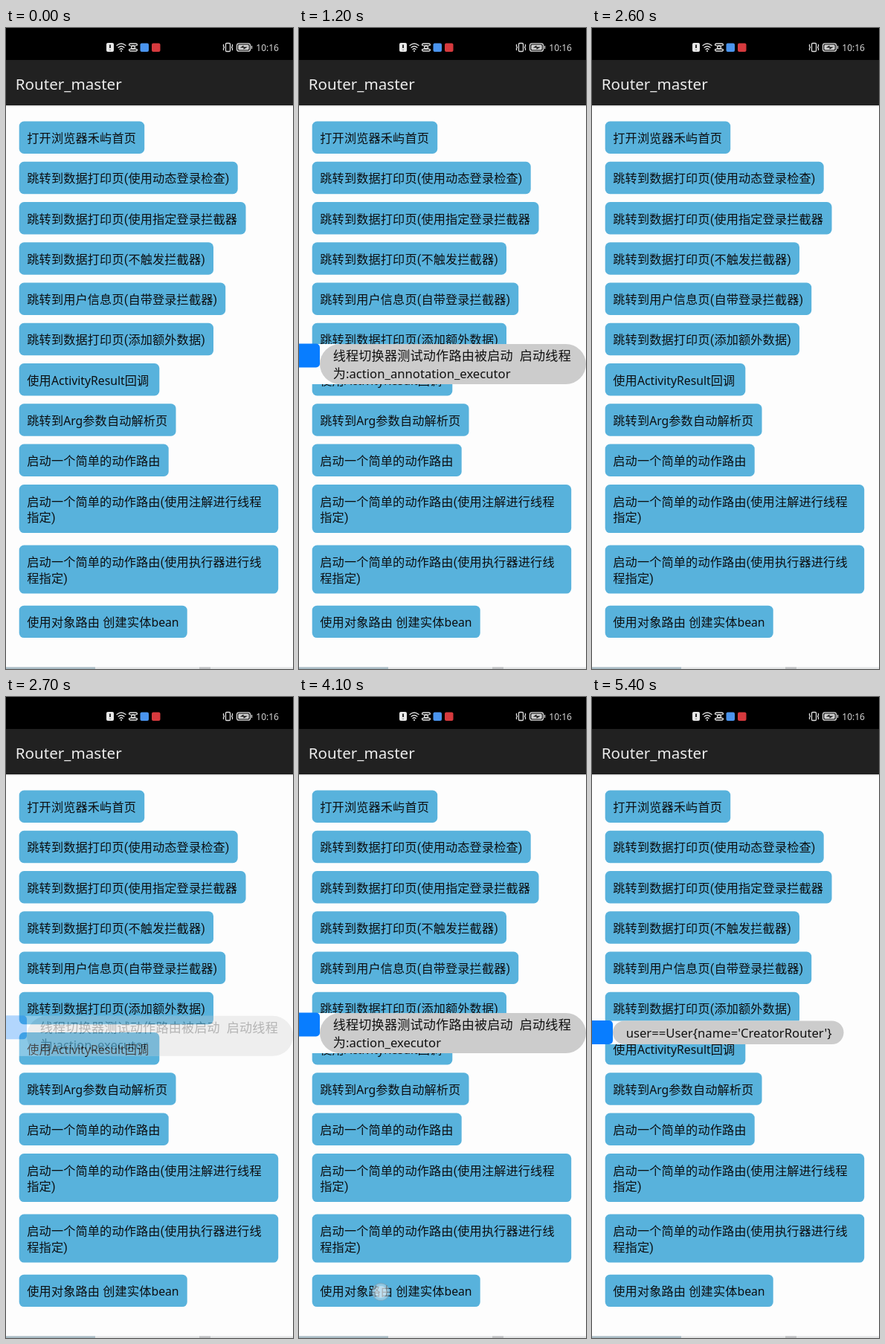
An HTML page that plays this animation: 386 by 862 pixels, repeating every 5.5 s.

```html
<!DOCTYPE html>
<html lang="zh-CN">
<head>
<meta charset="utf-8">
<style>
  html, body { margin: 0; width: 100%; height: 100%; overflow: hidden; background: #fdfdfd; }
  svg { display: block; width: 100%; height: 100%; }
  text { font: 16.15px Roboto, "Noto Sans CJK SC", "Noto Sans CJK", sans-serif; letter-spacing: .01em; fill: #0c0f12; white-space: pre; }
  .latin, .title, .clock { font-family: "Noto Sans", sans-serif; letter-spacing: 0; }
  .latin { font-size: .975em; }
  .title { font-size: 20.6px; fill: #ececec; }
  .clock { font-size: 12px; fill: #d4d4d4; }
  .toast text { font-size: 17.1px; fill: #111; letter-spacing: .012em; }
  .line { fill: none; stroke: #dedede; stroke-width: 1.3; stroke-linecap: round; }
</style>
</head>
<body>
<svg viewBox="0 0 386 862">
  <rect width="386" height="862" fill="#fdfdfd"/>
  <rect y="104" width="386" height="1.5" fill="#dcdcdc"/>
  <rect y="43" width="386" height="61" fill="#212121"/>
  <rect width="386" height="43" fill="#000"/>

  <rect x="135" y="20" width="10" height="12" rx="2" fill="#e8e8e8"/>
  <path d="M140 22.5v4.5M140 29v.6" stroke="#000" stroke-width="1.6"/>
  <path class="line" d="M149 23.5q6-5 12 0M151 26.2q4-3.4 8 0M153 28.7q2-1.8 4 0"/>
  <circle cx="155" cy="31" r="1.1" fill="#dedede"/>
  <path class="line" d="M165.5 23q0-2 2-2h7q2 0 2 2q-5.500 2.500-11 0M165.500 29q0 2 2 2h7q2 0 2-2q-5.500-2.500-11 0"/>
  <circle class="line" cx="171" cy="26" r="2.4"/>
  <rect x="180.500" y="20.500" width="11.500" height="11.500" rx="2" fill="#4a94ee"/>
  <rect x="196" y="20.500" width="11.500" height="11.500" rx="2" fill="#d63a3e"/>
  <rect class="line" x="295.500" y="20.500" width="6" height="11" rx="1.200"/>
  <path class="line" d="M292.500 22.500v2l1 1.500-1 1.500v2M304.500 22.500v2l-1 1.500 1 1.500v2"/>
  <rect class="line" x="310.500" y="20.800" width="18" height="10.400" rx="2.800"/>
  <rect x="312.300" y="22.600" width="14.400" height="6.800" rx="1.300" fill="#d0d0d0"/>
  <path d="M314.500 26.500l5-3v2h5.500l-5.500 3.200v-2.200z" fill="#111"/>
  <path class="line" d="M330.500 24.500v3"/>
  <text class="clock" x="336.300" y="31">10:16</text>
  <text class="title" x="12.800" y="82.700">Router_master</text>

  <g id="list"></g>
  <rect y="859.500" width="386" height="2.500" fill="#e2e4e5"/>
  <rect y="859.500" width="120" height="2.500" fill="#a9bcc5"/>
  <rect x="260" y="859.500" width="15" height="2.500" fill="#bfc1c3"/>

  <g id="toasts"></g>
  <g id="touch">
    <circle r="11.500" fill="#c9dfeb" fill-opacity=".5" stroke="#7f9cae" stroke-opacity=".5" stroke-width="1.300"/>
    <circle r="8" fill="#fff" fill-opacity=".4"/>
  </g>
</svg>
<script>
const LOOP = 5500, FRAME = 100;
const $ = id => document.getElementById(id);
const latin = s => s.replace(/[\w:={}']+/g, '<tspan class="latin">$&</tspan>');
const label = (x, y, s) => `<text x="${x}" y="${y}">${latin(s)}</text>`;

// top, width, lines
const buttons = [
  [125.5, 168.5, "打开浏览器禾屿首页"],
  [179.8, 294, "跳转到数据打印页(使用动态登录检查)"],
  [234, 304.8, "跳转到数据打印页(使用指定登录拦截器"],
  [288.3, 261.3, "跳转到数据打印页(不触发拦截器)"],
  [342.6, 277.5, "跳转到用户信息页(自带登录拦截器)"],
  [396.8, 261.3, "跳转到数据打印页(添加额外数据)"],
  [451.1, 188.6, "使用ActivityResult回调"],
  [505.3, 210.8, "跳转到Arg参数自动解析页"],
  [559.6, 201, "启动一个简单的动作路由"],
  [614, 348.5, "启动一个简单的动作路由(使用注解进行线程", "指定)"],
  [695.5, 348.5, "启动一个简单的动作路由(使用执行器进行线", "程指定)"],
  [776.7, 226, "使用对象路由 创建实体bean"]
];
$("list").innerHTML = buttons.map(([y, w, ...lines]) =>
  `<rect x="17.700" y="${y}" width="${w}" height="${21.7 + 21.7 * lines.length}" rx="6.500" fill="#58b2dc"/>` +
  lines.map((s, i) => label(28.3, y + 28.5 + 21.8 * i, s)).join("")).join("");

const notice = "线程切换器测试动作路由被启动  启动线程";
const toasts = [
  { from: 800, to: 2400, y: 425, w: 358, h: 54, lines: [notice, "为:action_annotation_executor"] },
  { from: 2700, to: 4200, y: 425, w: 358, h: 54, lines: [notice, "为:action_executor"] },
  { from: 4500, to: LOOP, y: 435.5, w: 310.5, h: 31.5, lines: ["user==User{name='CreatorRouter'}"] }
];
$("toasts").innerHTML = toasts.map(({ y, w, h, lines }) =>
  `<g class="toast"><rect y="${y}" width="386" height="${h}" fill="#fdfdfd"/>` +
  `<rect x="-4" y="${y - .5}" width="32" height="32" rx="5" fill="#087dff"/>` +
  `<rect x="28" y="${y}" width="${w}" height="${h}" rx="${h / 2}" fill="#ccc"/>` +
  lines.map((s, i) => label(45.7, y + 22.3 + 23.2 * i, s)).join("") + "</g>").join("");
const nodes = [...$("toasts").children];

const taps = [[700, 110, 659], [2300, 110, 728], [4100, 110, 800]];

function opacity(t, { from, to }) {
  if (t < from) return 0;
  if (t < to) return t < from + FRAME ? .3 : 1;
  return [.7, .2][(t - to) / FRAME] || 0;
}

function draw(now) {
  const t = Math.floor(now % LOOP / FRAME) * FRAME;
  nodes.forEach((node, i) => {
    const a = opacity(t, toasts[i]);
    node.setAttribute("opacity", a);
    node.setAttribute("transform", `translate(0 ${5.5 * (1 - a)})`);
  });
  const tap = taps.find(p => p[0] === t);
  $("touch").setAttribute("opacity", tap ? 1 : 0);
  if (tap) $("touch").setAttribute("transform", `translate(${tap[1]} ${tap[2]})`);
}

const start = performance.now();
function tick() {
  draw(performance.now() - start);
  requestAnimationFrame(tick);
}
tick();
</script>
</body>
</html>
```
